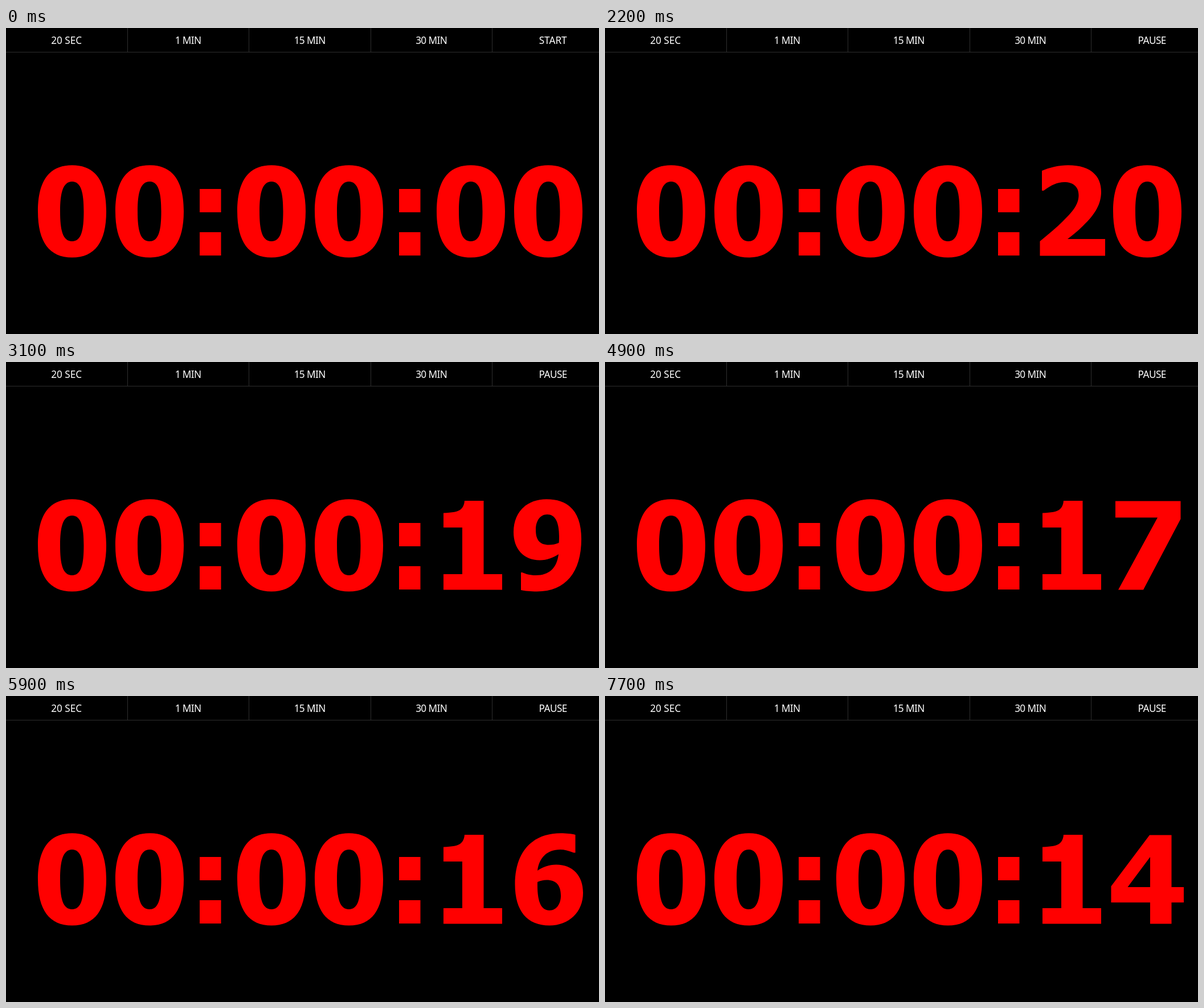
Recreate the animation shown at these times as an HTML page. Size 1041 by 538 pixels, loop 8000 ms.

```html
<!DOCTYPE html>
<html lang="en">
<head>
<meta charset="utf-8">
<title>Countdown</title>
<style>
html, body { margin: 0; width: 100%; height: 100%; overflow: hidden; background: #000; }
svg { display: block; width: 100vw; height: 100vh; }
text { font: 17.2px "Noto Sans", "Open Sans", sans-serif; fill: #fff; text-anchor: middle; }
.tight { letter-spacing: -.6px; }
</style>
</head>
<body>
<svg id="stage" viewBox="0 0 1041 538">
  <rect width="1041" height="538"/>
  <g id="menu"></g>
  <g id="clock" role="timer" fill="#f00" fill-rule="evenodd"></g>
</svg>
<script>
const LOOP = 8000;
const COLUMN = 213.5;
const SLOTS = [0, 136, 350, 486, 700, 836];

// Outline of each digit and the slot position it is drawn for
const GLYPHS = {
  0: [0, "M176 322.5C176 376.5 156 403.5 116 403.5S56 376.5 56 322.5S76 241.3 116 241.3S176 268 176 322.5Z" +
    "M136.5 322.5C136.5 290 132 270 116 270S95 290 95 322.5S99.5 375 116 375S136.5 355 136.5 322.5Z"],
  1: [700, "M805 244H838.5V373H871V400.5H768V373H801V291H768V265.5C784 265 793 263 797 260C802 256.5 804.5 251 805 244Z"],
  2: [700, "M767 251C780 245.5 797 241.3 813 241.3C850 241.3 871 258 871 288C871 309 861 327 839 348" +
    "C830 357 821 364 812 371H878V400.5H763.5V375C778 363 792 351.5 804 339.5C823 321 831.5 309 831.5 294" +
    "C831.5 279 822 271 806 271C795 271 783 276 770 286H767Z"],
  4: [836, "M956 244.5H994.5V336H1016V363H994.5V400.5H957V363H888.5V334.5ZM957 283L917.5 336H957Z"],
  5: [836, "M901.5 244.5H1003V273.5H936.5V299C943 297.5 950 296.5 957 296.5C991 296.5 1010 315 1010 347" +
    "C1010 382 985 403.5 942 403.5C924 403.5 908 400.5 896 395.5V361.5H899.5C911 370 925 375 938 375" +
    "C959 375 970 365 970 348C970 333 960 324.5 941 324.5C928 324.5 915 326.5 902 330Z"],
  6: [836, "M999.5 244V275.5H996.5C988 272 980 270 973 270C950 270 936 284 933 307C942 301 953 296.5 966 296.5" +
    "C995 296.5 1013 316 1013 346C1013 380 988 403.5 954 403.5C915 403.5 893.5 378 893.5 331" +
    "C893.5 276 922 241.3 974 241.3C983 241.3 993 242.3 999.5 244Z" +
    "M933 327C938 325 943 323.5 949 323.5C966 323.5 974 333 974 351C974 366 966 377 954 377C940 377 932 363 933 327Z"],
  7: [836, "M896 244.5H1010.5V276L945 400.5H901L970 273.5H896Z"],
  8: [836, "M1014 357C1014 385 989 403.5 951.5 403.5C914 403.5 889 384 889 356C889 338 899 326 917 319V318" +
    "C902 309 895 298 895 284C895 259 919 241.3 951.5 241.3C986 241.3 1008.5 257 1008.5 281" +
    "C1008.5 297 999 309 983 315.5V316.5C1004 324 1014 338 1014 357Z" +
    "M974 285C974 273 965 266.5 952 266.5C940 266.5 931.5 273 931.5 282C931.5 290 935 294 945 299" +
    "C951 302 959 305 965 307C971 300 974 294 974 285Z" +
    "M975.5 361C975.5 351 972 347 959 341C953 338 944 334 935 331C930 337 927.5 345 927.5 353" +
    "C927.5 368 937 378.5 952 378.5C966 378.5 975.5 372 975.5 361Z"],
  9: [836, "M1010 311C1010 369 983 403.5 932 403.5C921 403.5 910 402.5 904 401V370H906.5C912 372.5 919 375 930 375" +
    "C954 375 967 362 970 338C960 344 950 348.5 937 348.5C909 348.5 891 329 891 299" +
    "C891 264 914 241.3 949 241.3C990 241.3 1010 266 1010 311Z" +
    "M970.5 318C971 314 971 311 971 307C971 281 964 268 950 268C938 268 930 279 930 295" +
    "C930 313 937 321.5 953 321.5C959 321.5 965 320.5 970.5 318Z"]
};

// Start time and seconds left
const STEPS = [[0, 0], [500, 20], [3100, 19], [4000, 18], [4900, 17], [5900, 16], [6800, 15], [7700, 14]];
const RUN_AT = 2200;

const menu = document.getElementById("menu");
const clock = document.getElementById("clock");

function add(parent, tag, attrs) {
  const el = document.createElementNS("http://www.w3.org/2000/svg", tag);
  for (const key in attrs) el.setAttribute(key, attrs[key]);
  return parent.appendChild(el);
}

const line = (x, y, width, height) => add(menu, "rect", { x, y, width, height, fill: "#2e2e2e" });

line(0, 42, 1041, 1);
const labels = ["20 SEC", "1 MIN", "15 MIN", "30 MIN", "START"].map((name, i) => {
  if (i) line(Math.floor(i * COLUMN - .5), 0, 1, 42);
  const el = add(menu, "text", { x: (i + .5) * COLUMN - .6, y: 27.6 });
  el.textContent = name;
  if (name.endsWith("MIN")) el.setAttribute("class", "tight");
  return el;
});
const button = labels[4];

for (const x of [340, 690])
  for (const y of [283, 359]) add(clock, "rect", { x, y, width: 37.5, height: 41 });
const digits = SLOTS.map(() => add(clock, "path", {}));

let shown = "";
function draw(time) {
  const seconds = STEPS.filter(([start]) => time >= start).pop()[1];
  const value = String(seconds).padStart(6, "0");
  const running = time >= RUN_AT;
  if (shown === value + running) return;
  shown = value + running;

  digits.forEach((el, i) => {
    const [origin, outline] = GLYPHS[value[i]];
    el.setAttribute("d", outline);
    el.setAttribute("transform", `translate(${SLOTS[i] - origin})`);
  });
  clock.setAttribute("aria-label", value.match(/../g).join(":"));
  button.textContent = running ? "PAUSE" : "START";
  button.setAttribute("class", running ? "tight" : "");
}

const begin = performance.now();
function tick() {
  draw((performance.now() - begin) % LOOP);
  requestAnimationFrame(tick);
}
tick();
</script>
</body>
</html>
```
